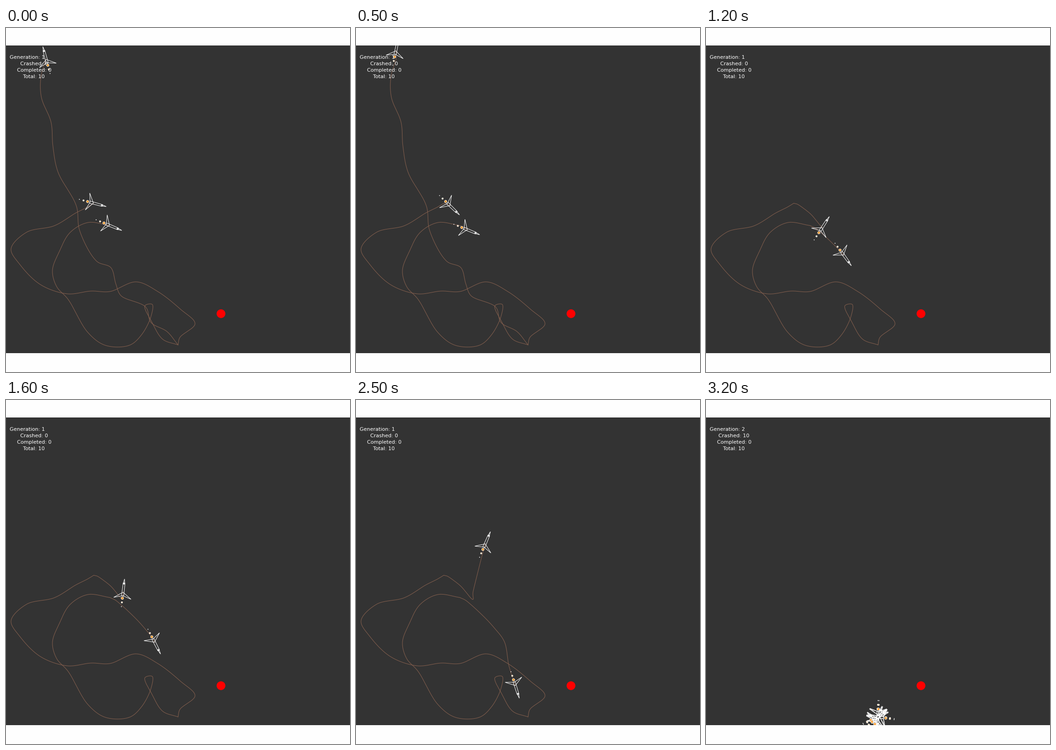
Animation of 748 by 748 pixels, one loop 3.3 s. Source, as a matplotlib script:

```python
import numpy as np
import matplotlib.pyplot as plt
from matplotlib.animation import FuncAnimation
from matplotlib.patches import Circle, Polygon

SIZE, TOP, BOTTOM, DPI = 748, 38, 707, 100
FRAMES, STEP_MS = 33, 100
LOST, RESET = 6, 30  # the first rocket leaves; the next generation starts
PX = 72 / DPI        # one pixel in points
TRAIL, ORANGE = "#86604e", "#ff9c2c"
PAD = np.array([374, 689])


def spline(t, keys, values):
    """Smooth curve through the values given at the keys."""
    t = np.atleast_1d(t).astype(float)
    slope = np.gradient(values, keys, axis=0)
    i = np.clip(np.searchsorted(keys, t, side="right") - 1, 0, len(keys) - 2)
    h = (keys[i + 1] - keys[i])[:, None]
    s = (t - keys[i])[:, None] / h
    return ((1 + 2 * s) * (1 - s) ** 2 * values[i]
            + s * (1 - s) ** 2 * h * slope[i]
            + s * s * (3 - 2 * s) * values[i + 1]
            + s * s * (s - 1) * h * slope[i + 1])


class Flight:
    """A trail from the pad, continued by keys (step, x, y, heading)."""

    def __init__(self, via, keys, end):
        keys = np.array(keys, float)
        self.times, self.poses, self.end = keys[:, 0], keys[:, 1:], end
        points = np.vstack([PAD, via, self.poses[0, :2]])
        chords = np.hypot(*np.diff(points, axis=0).T)
        knots = np.append(0, np.cumsum(np.sqrt(chords)))
        self.past = spline(np.linspace(0, knots[-1], 300), knots, points)

    def pose(self, t):
        return spline(t, self.times, self.poses)

    def trail(self, t):
        recent = self.pose(np.linspace(0, t, 4 * t + 1))[:, :2]
        return np.vstack([self.past, recent])


FLIGHTS = [
    Flight(
        [(350, 660), (315, 640), (304, 607), (250, 582), (239, 557),
         (228, 521), (197, 507), (160, 440), (153, 387), (113, 313),
         (102, 257), (98, 205), (77, 151), (76, 106)],
        [(0, 87.3, 67.5, -105), (5, 86.8, 48.8, -78.5)], LOST),
    Flight(
        [(378, 673), (411, 643), (380, 612), (330, 573), (283, 552),
         (226, 573), (185, 572), (133, 578), (75, 558), (30, 514),
         (11, 480), (45, 444), (105, 430), (152, 402), (176, 390)],
        [(0, 191, 381, 15), (5, 205, 387, 44), (8, 227, 404, 25),
         (12, 253, 433.4, -57), (16, 254.6, 417, -83.5),
         (20, 264, 378.3, -71), (25, 281.4, 312, -67),
         (29, 299, 261, -66)], RESET),
    Flight(
        [(341, 677), (318, 641), (302, 604), (318, 601), (315, 628),
         (294, 668), (268, 690), (216, 690), (178, 662), (135, 590),
         (110, 562), (101, 527), (116, 486), (139, 445), (178, 423)],
        [(0, 226, 429.5, 22.6), (5, 243, 439, 22), (12, 299.7, 494.4, 54),
         (16, 323.4, 527.5, 63), (20, 332, 575.8, 81),
         (25, 346.7, 621.8, 72.5), (29, 357, 657, 70)], RESET),
]

fig = plt.figure(figsize=(SIZE / DPI, SIZE / DPI), dpi=DPI,
                 facecolor="#fefefe")
ax = fig.add_axes([0, 1 - BOTTOM / SIZE, 1, (BOTTOM - TOP) / SIZE],
                  facecolor="#333333")
ax.set(xlim=(0, SIZE), ylim=(BOTTOM, TOP), xticks=[], yticks=[])
for spine in ax.spines.values():
    spine.set_visible(False)
ax.add_patch(Circle((467.5, 621.2), 9.5, color="red", lw=0))
labels = [ax.text(x, 67.3 + 14 * row, "", color="white", ha="center",
                  va="baseline", family="DejaVu Sans", size=11.15 * PX)
          for row, x in enumerate((46.7, 61, 61, 61))]
live = []


def add(patch):
    live.append(ax.add_patch(patch))


def draw_rocket(x, y, heading):
    """Outlines have u along the heading, v across it."""
    a = np.radians(heading)
    turn = np.array([[np.cos(a), np.sin(a)], [-np.sin(a), np.cos(a)]])

    def place(points):
        return np.array(points) @ turn + (x, y)

    wings = [(-14.3, -19), (-1, 0), (-14.3, 19), (-8.5, 0)]
    body = [(-9, -2.5), (19, -2), (19, 2), (-9, 2.5)]
    nose = [(17.5, -1.7), (28, 0), (17.5, 1.7)]
    for outline in (wings, body, nose):
        add(Polygon(place(outline), fill=False, ec="white", lw=PX,
                    joinstyle="bevel", zorder=4))
    add(Circle(place((18.2, 0)), 1.7, fill=False, ec="white", lw=PX,
               zorder=4))
    for i, color in enumerate((ORANGE, "#ffd9ae", "white")):
        add(Circle(place((-14 - 9.25 * i, 0)), 2.7 - 1.1 * i, fc=color,
                   ec="white", lw=0.8 * PX, zorder=5))


def draw_launch(age):
    """Ten rockets in close pairs, slipping backwards off the pad."""
    for heading in (90, 186, -27, -43, -70):
        a = np.radians(heading)
        x, y = PAD - 1.5 * age * np.array([np.cos(a), np.sin(a)])
        for spread in (0, 4):
            draw_rocket(x, y, heading + spread * (age - 1))


def draw(k):
    for artist in live:
        artist.remove()
    live.clear()

    fresh = k >= RESET
    lines = (f"Generation: {2 if fresh else 1}",
             f"Crashed: {10 if fresh else 0}", "Completed: 0", "Total: 10")
    for label, line in zip(labels, lines):
        label.set_text(line)

    for flight in FLIGHTS:
        if k < flight.end:
            live.extend(ax.plot(*flight.trail(k).T, color=TRAIL, lw=PX,
                                zorder=1))
            draw_rocket(*flight.pose(k)[0])
    if fresh:
        draw_launch(k - RESET)
    return live


anim = FuncAnimation(fig, draw, frames=FRAMES, interval=STEP_MS,
                     repeat=True, repeat_delay=0, blit=False)
plt.show()
```
